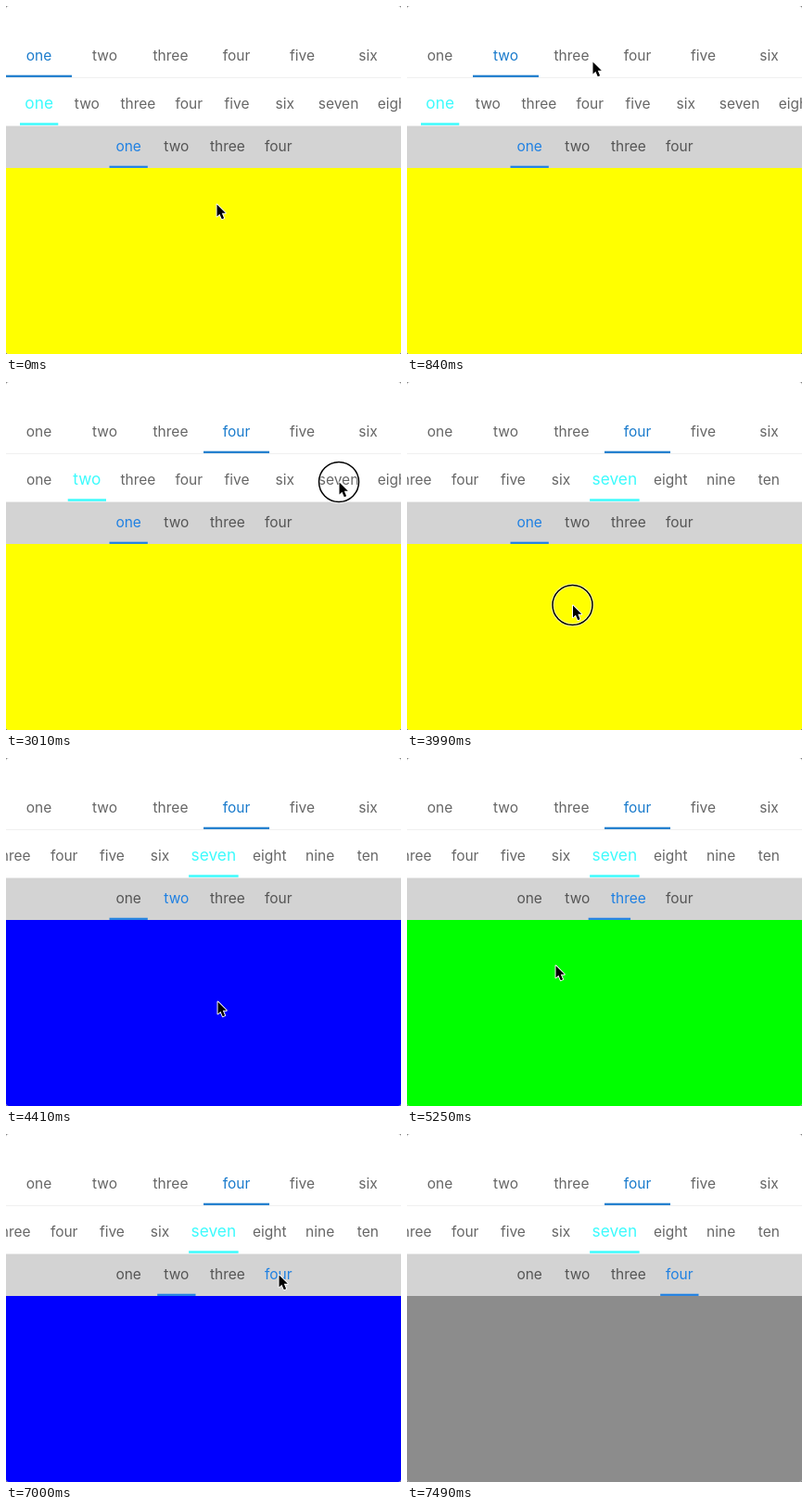
Animation, 426 px wide and 376 px high, one loop 7770 ms. Source, as an HTML page:

```html
<!DOCTYPE html>
<html lang="en">
<head>
<meta charset="utf-8">
<title>Tab bars</title>
<style>
  html, body { margin: 0; width: 100%; height: 100%; overflow: hidden; background: #777; }
  svg { display: block; width: 426px; height: 376px; border-radius: 3px; background: #fff; }
  text { font: 15.5px Inter, Roboto, sans-serif; text-anchor: middle; }
</style>
</head>
<body>
<svg id="stage" viewBox="0 0 426 376"></svg>
<script>
const NS = 'http://www.w3.org/2000/svg';
const W = 426, STEP = 70, LOOP = 7770, LAST = 7490;
const PRESS = 140, SLIDE = 280;
const words = 'one two three four five six seven eight nine ten'.split(' ');

const clamp = v => Math.min(1, Math.max(0, v));
const smooth = v => v * v * (3 - 2 * v);
const easeOut = v => 1 - (1 - v) ** 3;
const mix = (a, b, k) => a + (b - a) * k;

function set(el, attrs) {
  for (const k in attrs) el.setAttribute(k, attrs[k]);
}
function add(parent, tag, attrs) {
  const el = parent.appendChild(document.createElementNS(NS, tag));
  set(el, attrs);
  return el;
}
const rect = (parent, x, y, width, height, fill) =>
  add(parent, 'rect', { x, y, width, height, fill });

// Pointer script. A tap or swipe selects a tab of a bar; a rest is a plain waypoint.
const rest = (t, x, y) => ({ arrive: t, down: t, up: t, x, y, dx: 0 });
const swipe = (down, x, y, dx, bar, tab) =>
  ({ arrive: down - PRESS, down, up: down + PRESS, x, y, dx, bar, tab });
const tap = (down, x, y, bar, tab) => swipe(down, x, y, 0, bar, tab);

const moves = [
  rest(0, 227, 214),
  tap(420, 106, 57, 0, 1),
  rest(1050, 261, 62),
  tap(1260, 261, 62, 0, 3),
  rest(1750, 104, 106),
  tap(1960, 100, 107, 1, 1),
  tap(2940, 359, 108, 1, 6),
  swipe(3990, 178.5, 241, -150, 2, 1),
  rest(4410, 228, 263),
  swipe(4666, 235, 264, -150, 2, 2),
  rest(5250, 160, 224),
  swipe(5950, 80, 210, 210, 2, 1),
  rest(6230, 277, 198),
  tap(6860, 294, 152, 2, 3),
  rest(LAST, 330, 380)
];

const path = moves.flatMap(({ arrive, down, up, x, y, dx }) =>
  [[arrive, x, y], [down, x, y], [up, x + dx, y]]);

function pointerAt(t) {
  const i = Math.max(1, path.findIndex(p => p[0] >= t));
  const [t0, x0, y0] = path[i - 1], [t1, x1, y1] = path[i];
  const k = t1 > t0 ? smooth((t - t0) / (t1 - t0)) : 1;
  return [mix(x0, x1, k), mix(y0, y1, k)];
}

function pageAt(t) {
  let page = 0;
  for (const { down, up, dx, bar, tab } of moves) {
    if (bar !== 2 || t < down) continue;
    const held = page - dx / W * smooth(clamp((t - down) / PRESS));
    page = mix(held, tab, easeOut(clamp((t - up) / SLIDE)));
  }
  return page;
}

const stage = document.getElementById('stage');
const pages = add(stage, 'g', {});
['#ff0', '#00f', '#0f0', '#8c8c8c'].forEach((c, i) => rect(pages, i * W, 175, W, 201, c));
rect(stage, 0, 77, W, 1, '#f0f0f0');
rect(stage, 0, 129, W, 1, '#ececec');
rect(stage, 0, 130, W, 45, '#d3d3d3');

// Tabs share the width evenly, scroll from a left inset, or sit centred.
function layout(labels, fit) {
  const even = W / labels.length, gap = 10.4;
  const widths = labels.map(l =>
    fit === 'even' ? even : Math.max(41.3, l.getComputedTextLength() + 10));
  const space = fit === 'even' ? 0 : gap;
  const total = widths.reduce((a, b) => a + b + space, -space);
  let x = fit === 'scroll' ? 15 : (W - total) / 2;
  const tabs = widths.map(width => {
    const tab = { mid: x + width / 2, width };
    x += width + space;
    return tab;
  });
  return { tabs, scroll: Math.max(0, total + 30 - W) };
}

function makeBar(id, { count, fit, base, line, thick = 2.2, color, size = 15.5, plain = '#666' }) {
  const group = add(stage, 'g', {});
  const labels = words.slice(0, count).map(word => {
    const label = add(group, 'text', { y: base });
    label.textContent = word;
    return label;
  });
  const { tabs, scroll } = layout(labels, fit);
  labels.forEach((label, i) => set(label, { x: tabs[i].mid }));
  const mark = rect(group, 0, line, 0, thick, color);
  const offset = i => fit === 'scroll' ? Math.min(scroll, Math.max(0, tabs[i].mid - W / 2)) : 0;
  // A swipe selects its tab only once the page has settled.
  const picks = moves.filter(m => m.bar === id)
    .map(m => ({ at: m.up + (m.dx ? SLIDE : 0), tab: m.tab }));

  return t => {
    const [now, before] = [{ at: 0, tab: 0 }, ...picks].filter(p => p.at <= t).reverse();
    const k = smooth(clamp((t - now.at) / SLIDE));
    const a = (before || now).tab, b = now.tab;
    const width = mix(tabs[a].width, tabs[b].width, k);
    set(mark, { x: mix(tabs[a].mid, tabs[b].mid, k) - width / 2, width });
    set(group, { transform: `translate(${-mix(offset(a), offset(b), k)})` });
    labels.forEach((label, i) => {
      label.style.fill = i === b ? color : plain;
      label.style.fontSize = (i === b ? size : 15.5) + 'px';
    });
  };
}

const bars = [
  { count: 6, fit: 'even', base: 59, line: 74.7, color: '#1a7bcc' },
  { count: 10, fit: 'scroll', base: 111, line: 126.3, thick: 2.5, color: '#3dfbfd', size: 17.3 },
  { count: 4, fit: 'centre', base: 157, line: 172.7, color: '#1f80e2', plain: '#555' }
].map((options, id) => makeBar(id, options));

const pointer = add(stage, 'g', {});
const ring = add(pointer, 'g', { fill: 'none' });
add(ring, 'circle', { r: 21.5, stroke: '#fff', 'stroke-width': 3.6, opacity: .6 });
add(ring, 'circle', { r: 21.5, stroke: '#000', 'stroke-width': 1.5 });
add(pointer, 'path', {
  d: 'M.5 .5V13.4L3.4 10.7L5.8 16.2L8.1 15.2L5.8 9.8H9.8Z',
  stroke: '#fff', 'stroke-width': 1.9, 'paint-order': 'stroke', 'stroke-linejoin': 'round'
});

function draw(t) {
  bars.forEach(bar => bar(t));
  set(pages, { transform: `translate(${-pageAt(t) * W})` });
  set(pointer, { transform: `translate(${pointerAt(t)})` });
  ring.style.display = moves.some(m => t >= m.down && t < m.up) ? '' : 'none';
}

const begin = performance.now();
function tick() {
  const t = (performance.now() - begin) % LOOP;
  draw(Math.min(LAST, Math.floor(t / STEP) * STEP));
  requestAnimationFrame(tick);
}
tick();
</script>
</body>
</html>
```
